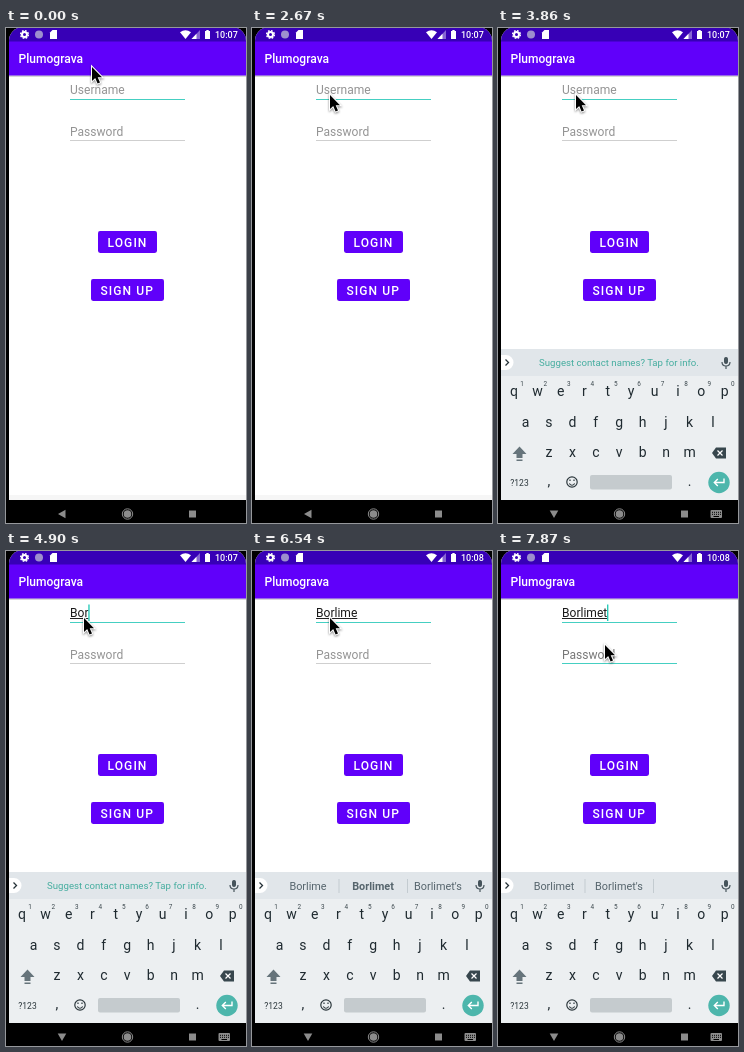
An HTML page that plays this animation: 240 px wide and 495 px high, repeating every 8 s.

```html
<!DOCTYPE html>
<html lang="en">
<meta charset="utf-8">
<title>Login screen</title>
<style>
  html, body { margin: 0; width: 100%; height: 100%; overflow: hidden; background: #000; }
  svg { display: block; width: 240px; height: 495px; font-family: Roboto, sans-serif; }
  text { white-space: pre; }
  .mid { text-anchor: middle; }
  .field { font-size: 12.06px; }
  .hint { fill: #949494; }
  .button rect { fill: #6000fa; filter: drop-shadow(0 .6px .6px #0004); }
  .button text { fill: #fff; font-size: 12.06px; font-weight: 500; letter-spacing: .0892em; }
  .key { font-size: 14px; fill: #1f2a30; }
  .digit { font-size: 6.4px; fill: #3c484e; }
  .word { font-size: 10.85px; fill: #56656d; }
  #mouse { filter: drop-shadow(0 1px 1px #0007); }
</style>
<svg viewBox="0 0 240 495">
  <clipPath id="screen"><rect x="3" y="-1" width="237" height="497" rx="14"/></clipPath>
  <rect width="240" height="495"/>
  <g clip-path="url(#screen)">
    <path d="M3 0H240V472H3Z" fill="#fff"/>
    <path d="M3 467H240V472H3Z" fill="#f6f6f6"/>
    <path d="M3 47H240V49H3Z" fill="#bbb" opacity=".6"/>
    <path d="M3 13H240V47.500H3Z" fill="#6000fa"/>
    <path d="M3 0H240V13.500H3Z" fill="#3700b6"/>

    <g fill="#fff">
      <circle cx="18.500" cy="6.500" r="2.500" fill="none" stroke="#fff" stroke-width="2"/>
      <circle cx="18.500" cy="6.500" r="3.900" fill="none" stroke="#fff" stroke-width="1.400" stroke-dasharray="1.7 1.36"/>
      <circle cx="33" cy="6.500" r="4" fill="#9d8fce"/>
      <path d="M46.500 2H51V11H44V4.500Z"/>
      <path d="M174 4.300Q179.500 .3 185 4.300L179.500 11Z"/>
      <path d="M194 2V11H185.500Z" opacity=".4"/>
      <path d="M190.500 5.700V11H185.500Z"/>
      <path d="M199 3H200.300V2H202.700V3H204V11H199Z"/>
      <text id="clock" x="209" y="10" font-size="9" font-weight="500"></text>
      <text x="12.500" y="35" font-size="12.060" font-weight="500">Plumograva</text>
    </g>

    <text id="userHint" class="field hint" x="64" y="66">Username</text>
    <text id="user" class="field" x="64" y="66" fill="#1a1a1a"></text>
    <path id="spell" stroke="#222"/>
    <path d="M64 71.500H179" stroke="#45cfc2"/>
    <text id="passHint" class="field" x="64" y="107.500">Password</text>
    <path id="passLine" d="M64 112.500H179"/>
    <path id="caret" stroke="#1cc8b4" stroke-width="1.300"/>

    <g class="button"><rect x="92" y="203" width="59" height="22" rx="2.400"/><text x="101.500" y="218.500">LOGIN</text></g>
    <g class="button"><rect x="85" y="251" width="73" height="22" rx="2.400"/><text x="94.500" y="266.800">SIGN UP</text></g>

    <g id="keyboard">
      <path d="M3 321H240V472H3Z" fill="#eceff1"/>
      <path d="M3 321H240V348H3Z" fill="#e1e6ea"/>
      <path d="M3 327H8A7.500 7.500 0 0 1 8 342H3Z" fill="#fff"/>
      <path d="M7.500 331.500L10.500 334.500L7.500 337.500" fill="none" stroke="#263238" stroke-width="1.300"/>
      <text id="tip" class="mid" x="121" y="338" font-size="9.650" fill="#45ad9f">Suggest contact names? Tap for info.</text>
      <g id="words">
        <path d="M87 328V342M155.500 328V342" stroke="#c3cbd0"/>
        <text class="word mid" x="56" y="338.500"></text>
        <text class="word mid" x="121" y="338.500"></text>
        <text class="word mid" x="186" y="338.500"></text>
      </g>
      <g fill="none" stroke="#46545b" stroke-width="1.200">
        <rect x="226.600" y="329.600" width="2.800" height="5.800" rx="1.400" fill="#46545b"/>
        <path d="M224 334Q224 338 228 338T232 334M228 338V341"/>
        <g stroke="#2b363b">
          <circle cx="74" cy="454" r="5.200"/>
          <path d="M71.300 455.500Q74 459 76.700 455.500M72 451.500V453M76 451.500V453"/>
        </g>
      </g>
      <g id="keys"></g>
      <path d="M21.500 418.500L28.500 426H24.500V430H18.500V426H14.500ZM18.500 431.500H24.500V433H18.500Z" fill="#66747b"/>
      <path d="M214 425L218 419.500H228V430.500H218Z" fill="#37464d"/>
      <path d="M219.500 422.500L224.500 427.500M224.500 422.500L219.500 427.500" stroke="#fff" stroke-width="1.200"/>
      <text class="mid" x="21.500" y="457.500" font-size="8.500" fill="#2b363b">?123</text>
      <text class="key mid" x="51" y="458">,</text>
      <text class="key mid" x="191.500" y="458">.</text>
      <rect x="92" y="447" width="82" height="14.500" rx="2" fill="#c5cbce"/>
      <circle cx="221" cy="454.500" r="10.700" fill="#4db6ac"/>
      <path d="M226 450.500V454.500H216.500M219.800 451L216.300 454.500L219.800 458" fill="none" stroke="#fff" stroke-width="1.400"/>
    </g>
    <path id="navShade" d="M3 472H240V495H3Z"/>

    <g fill="#fff" opacity=".55">
      <path id="back" d="M52 486L59.500 481.700V490.300Z"/>
      <circle cx="121.500" cy="486" r="3.800"/>
      <circle cx="121.500" cy="486" r="5.200" fill="none" stroke="#fff"/>
      <path d="M183 482.500H190V489.500H183Z"/>
      <g id="imeIcon">
        <rect x="212.500" y="482" width="11.500" height="8" rx="1"/>
        <path d="M214 484.300H223M214 486.300H223" stroke="#000" stroke-dasharray="1 1"/>
        <path d="M215.500 488.500H221" stroke="#000"/>
      </g>
    </g>
  </g>
  <path id="mouse" d="M0 0V14L3.200 11L5.600 16.500L8 15.400L5.700 10.300H10Z" stroke="#fff" stroke-width="2" paint-order="stroke"/>
</svg>
<script>
const $ = id => document.getElementById(id);
const set = (el, attrs) => Object.entries(attrs).forEach(([k, v]) => el.setAttribute(k, v));
const show = (el, on) => set(el, { visibility: on ? 'visible' : 'hidden' });

const LOOP = 8000, STEP = 148.5;
const NAME = 'Borlimet';
const TYPED_AT = [30, 32, 33, 35, 38, 39, 41, 45];
const CARET_ON = [[2, 5], [8, 12], [15, 18], [21, 24], [30, 44], [45, 48], [51, 54]];
const MOUSE_PATHS = [
  [[0, 86, 39], [2, 72, 72], [3, 54, 84], [5, 18, 82], [6, 6, 77], [7, 6, 77]],
  [[12, 4, 75], [13, 25, 75], [15, 70, 69], [16, 78, 67], [46, 78, 67], [48, 86, 76], [51, 107, 94], [53, 107, 94]]
];

function addText(cls, x, y, label) {
  const el = document.createElementNS('http://www.w3.org/2000/svg', 'text');
  set(el, { class: cls + ' mid', x, y });
  el.textContent = label;
  $('keys').append(el);
  return el;
}
const letters = [];
[['qwertyuiop', 16, 368], ['asdfghjkl', 27.5, 398.5], ['zxcvbnm', 51, 428.5]].forEach(([row, x, y], r) =>
  [...row].forEach((ch, i) => {
    const keyX = x + i * 23.42;
    letters.push([addText('key', keyX, y, ch), ch]);
    if (!r) addText('digit', keyX + 8, 358, (i + 1) % 10);
  }));

function mouseAt(n) {
  const path = MOUSE_PATHS.find(p => n >= p[0][0] && n <= p.at(-1)[0]);
  if (!path) return null;
  const i = Math.max(1, path.findIndex(p => p[0] >= n));
  const [a, b] = [path[i - 1], path[i]];
  const k = (n - a[0]) / (b[0] - a[0]);
  return [a[1] + (b[1] - a[1]) * k, a[2] + (b[2] - a[2]) * k];
}

function drawWords(n, typed) {
  const done = typed === NAME;
  const words = done ? [NAME, NAME + "'s", ''] : [typed, NAME, NAME + "'s"];
  show($('tip'), n < 35);
  show($('words'), n >= 35);
  document.querySelectorAll('.word').forEach((el, i) => {
    el.textContent = words[i];
    set(el, { 'font-weight': i === 1 && !done ? 700 : 400 });
  });
}

function draw(n) {
  const typed = NAME.slice(0, TYPED_AT.filter(at => n >= at).length);
  $('clock').textContent = n < 39 ? '10:07' : '10:08';
  $('user').textContent = typed;
  show($('userHint'), !typed);
  const end = 64 + (typed ? $('user').getComputedTextLength() : 0);
  set($('spell'), { d: `M64 67.500H${end}` });
  show($('spell'), typed);
  set($('caret'), { d: `M${end + .5} 53.500V70` });
  show($('caret'), CARET_ON.some(([on, off]) => n >= on && n < off));
  set($('passLine'), { stroke: n < 53 ? '#cfcfcf' : '#45cfc2' });
  set($('passHint'), { fill: n < 53 ? '#949494' : '#777' });

  // The keyboard slides up while fading in, over the navigation bar.
  const [shift, alpha] = n < 24 ? [60, 0] : n < 25 ? [50, .25] : n < 26 ? [29.5, .6] : [0, 1];
  set($('keyboard'), { transform: `translate(0 ${shift})`, opacity: alpha });
  show($('navShade'), alpha === 0 || alpha === 1);
  letters.forEach(([el, ch]) => el.textContent = n === 29 || n === 30 ? ch.toUpperCase() : ch);
  drawWords(n, typed);

  const turn = Math.min(1, Math.max(0, (n - 19) / 2));
  set($('back'), { transform: `rotate(${-90 * turn} 56 486)` });
  set($('imeIcon'), { opacity: turn });

  const tip = mouseAt(n);
  show($('mouse'), tip);
  if (tip) set($('mouse'), { transform: `translate(${tip})` });
}

function tick() {
  draw(Math.floor(performance.now() % LOOP / STEP + .08));
  requestAnimationFrame(tick);
}
tick();
</script>
</html>
```
